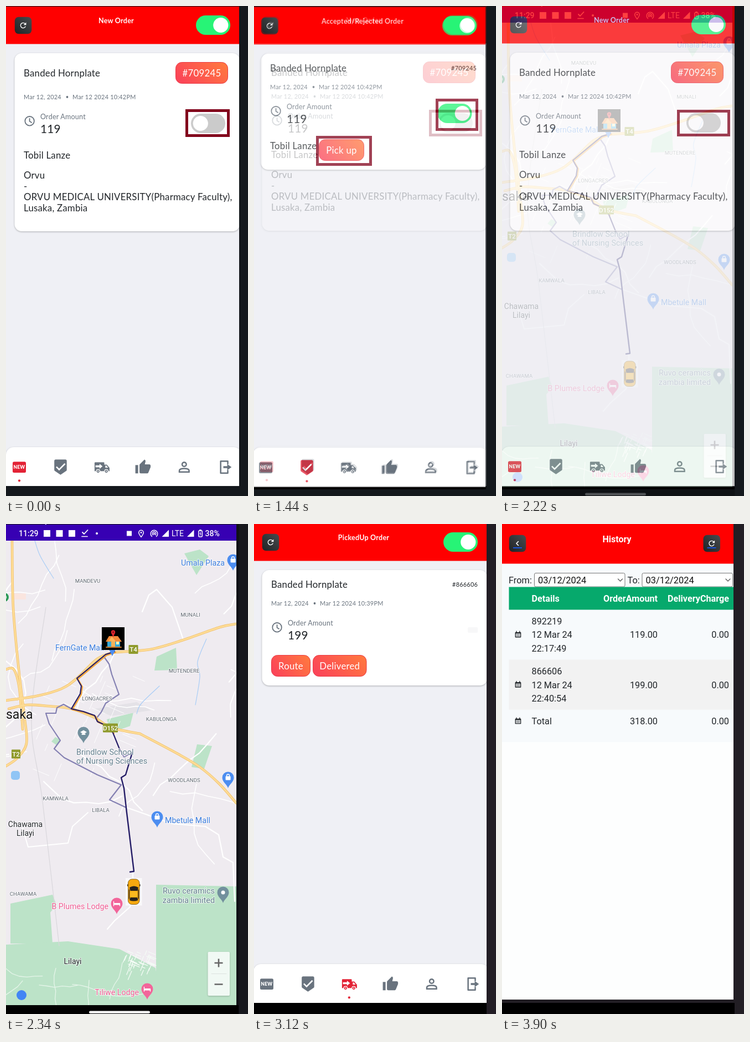
These frames come from a looping animation (437x883 px, 4.56 s). An HTML page:

```html
<!DOCTYPE html>
<html lang="en">
<head>
<meta charset="utf-8">
<title>Delivery app tour</title>
<style>
html, body { margin: 0; width: 100%; height: 100%; overflow: hidden; background: #14181c; }
svg { display: block; width: 100%; height: 100%; }
.app { font-family: Lato, "Open Sans", sans-serif; letter-spacing: .015em; }
.rob { font-family: Roboto, "Liberation Sans", sans-serif; }
.card { filter: drop-shadow(0 1px 1.5px rgba(0,0,0,.28)); }
.halo text { paint-order: stroke; stroke: #fff; stroke-width: 2px; stroke-linejoin: round; stroke-opacity: .75; }
</style>
</head>
<body>
<svg id="stage" viewBox="0 0 437 883" preserveAspectRatio="none"></svg>
<script>
const W = 437, H = 883;
const INK = '#212529', GREY = '#69737e', RED = '#e32235', MARK = '#82021c';

// ---- drawing helpers ----
const rect = (x, y, w, h, fill, r = 0, more = '') =>
  `<rect x="${x}" y="${y}" width="${w}" height="${h}" rx="${r}" fill="${fill}" ${more}/>`;
const dot = (x, y, r, fill) => `<circle cx="${x}" cy="${y}" r="${r}" fill="${fill}"/>`;
const text = (x, y, str, size, fill = INK, anchor = 'start', weight = 400) =>
  `<text x="${x}" y="${y}" font-size="${size}" fill="${fill}" text-anchor="${anchor}" font-weight="${weight}">${str}</text>`;
const path = (d, more = '') => `<path d="${d}" ${more}/>`;
const outline = (color, w) => `fill="none" stroke="${color}" stroke-width="${w}" stroke-linejoin="round" stroke-linecap="round"`;
const line = (pts, color, w, more = '') => `<polyline points="${pts}" ${outline(color, w)} ${more}/>`;
const area = (pts, fill) => `<polygon points="${pts}" fill="${fill}"/>`;
const icon = (x, y, scale, body, fill) =>
  `<g transform="translate(${x} ${y}) scale(${scale}) translate(-12 -12)" fill="${fill}">${body}</g>`;
const frame = (x1, y1, x2, y2) =>
  rect(x1 + 2.5, y1 + 2.5, x2 - x1 - 5, y2 - y1 - 5, 'none', 0, `stroke="${MARK}" stroke-width="5"`);

// Path data of a smooth curve through a few points.
function curve(str) {
  const p = str.split(' ').map(s => s.split(',').map(Number));
  let d = 'M' + p[0];
  for (let i = 0; i < p.length - 1; i++) {
    const a = p[Math.max(i - 1, 0)], b = p[i], c = p[i + 1], e = p[Math.min(i + 2, p.length - 1)];
    const near = b.map((v, k) => v + (c[k] - a[k]) / 6), far = c.map((v, k) => v - (e[k] - b[k]) / 6);
    d += `C${near} ${far} ${c}`;
  }
  return d;
}

// ---- icons on a 24 unit grid ----
const REFRESH = path('M18 15a6.800 6.800 0 1 1-1.200-7.800'.replace(/00/g, ''), outline('#fff', 2)) + path('M20 4v7h-7z');
const CLOCK = path('M2.800 12a9.200 9.200 0 1 0 18.400 0a9.200 9.200 0 1 0-18.400 0M12 7v5.400l4 2.500'.replace(/00/g, ''), outline(GREY, 2));
const BADGE = path('M5 1h14q2 0 2 2v13q0 1-1 1.600L12 23l-8-5.400q-1-.6-1-1.600V3q0-2 2-2z'.replace(/00/g, '')) +
  path('M6 11.500l4 4 8.500-8.500'.replace(/00/g, ''), 'fill="none" stroke="#fff" stroke-width="2"');
const THUMB = path('M1 9h4v12H1zM7 9q0-.8.6-1.400L14.200 1l1 1q.6.6.5 1.400L14.700 8H21q2 0 2 2v2l-3.200 7.800Q19.300 21 18 21H9q-2 0-2-2z'.replace(/00/g, ''));
const PERSON = path('M9 8a3 3 0 1 0 6 0a3 3 0 1 0-6 0M5 19v-2c0-4 14-4 14 0v2z', 'fill="none" stroke="#69737e" stroke-width="2"');
const EXIT = path('M15.4 7V3.4H5.1v17.2h10.3V17', outline(GREY, 2)) + path('M9 10.6h5.6v-3L20.8 12l-6.2 4.4v-3H9z');
const TRUCK = path('M2.6 5h12.2q.9 0 .9.9v2.4h3.7l3.8 4.6v4.8H1.6V6q0-1 1-1z') +
  path('M3 9.3h5.8V7.1l4.4 3.6-4.4 3.6v-2.2H3zM17.2 9.8h1.7l2.2 2.9h-3.9z', 'fill="#fff"') +
  [6.7, 18.6].map(x => `<circle cx="${x}" cy="17.8" r="2.6" stroke="#fff"/>` + dot(x, 17.8, .9, '#fff')).join('');
const NEW = path('M4.4 4.2h15.2q2 0 2 2V18q0 2-2 2H4.4q-2 0-2-2V6.2q0-2 2-2z') + text(12, 14.6, 'NEW', 6.7, '#fff', 'middle', 900);
const CALENDAR = path('M4 6h16v14H4zM7 2v4M17 2v4', outline(INK, 2.4)) + path('M4 6h16v3H4z') +
  [7, 10.7, 14.4].map(x => rect(x, 11, 2.4, 2.2, INK) + rect(x, 15, 2.4, 2.2, INK)).join('');

// ---- shared widgets ----
const toggle = (x, y, on) => rect(x, y, 62, 35, on ? '#27f476' : '#cbcbcb', 17.5) +
  dot(x + (on ? 44.8 : 17.3), y + 17.5, 13.6, '#fff');
const darkKey = (x, y, body) => rect(x, y, 30.5, 30.5, 'url(#key)', 7) + body;
const pill = (x, y, w, label) =>
  rect(x + .5, y + .5, w - 1, 38, 'url(#hot)', 11, 'stroke="#ea3a45"') +
  text(x + w / 2, y + 26, label, 16.8, '#fff', 'middle');

function navBar(active) {
  const items = [NEW, BADGE, TRUCK, THUMB, PERSON, EXIT];
  return rect(0, 795, 425, 100, '#fff', 14, 'class="card"') + items.map((item, i) => {
    const on = i === active, x = 24 + i * 74.45;
    return icon(x, 831, 1.25, item, on ? RED : GREY) + (on ? dot(x, 855.3, 2.1, RED) : '');
  }).join('');
}

// Order list screen; dx, dy place the whole screen on the stage.
function orderScreen(o) {
  const up = o.plain ? 19 : 0;
  const body = rect(-5, 1, 440, 890, '#eff0f5') + rect(-5, 1, 440, 67.5, '#f00') +
    darkKey(15.8, 19.8, icon(31, 35, .68, REFRESH, '#fff')) +
    text(199, 31, o.title, 12.5, '#fff', 'middle', 700) + toggle(343, 17, true) +
    rect(15.5, 85, 406.5, o.cardH, '#fff', 13, 'class="card"') +
    text(32, o.plain ? 117 : 127, 'Banded Hornplate', 16.8) +
    (o.plain ? text(405, 115, o.id, 10.9, INK, 'end') : pill(306, 101, 95, o.id)) +
    text(32, 168 - up, 'Mar 12, 2024', 10.9, GREY) + dot(110.5, 164 - up, 1.9, GREY) +
    text(120, 168 - up, 'Mar 12 2024 ' + o.time, 10.9, GREY) +
    icon(42.6, 207.3 - up, .9, CLOCK, 'none') +
    text(62, 204 - up, 'Order Amount', 12.5, GREY) + text(62, 228.5 - up, o.amount, 20.8) +
    o.extra + navBar(o.active);
  return rect(0, 0, W, H, o.side) + `<g class="app" transform="translate(${o.dx} ${o.dy})">${body}</g>` +
    rect(o.right, 0, W - o.right, H, o.side) + rect(0, o.bottom, W, H - o.bottom, o.side) +
    rect(0, o.bottom, o.right, o.black - o.bottom, '#000') +
    rect(0, 0, W, Math.max(0, 1 + o.dy), o.side) + (o.marks || '');
}

const address = toggle(334, 194, false) + text(32, 275, 'Tobil Lanze', 16.8) +
  ['Orvu', '-', 'ORVU MEDICAL UNIVERSITY(Pharmacy Faculty),', 'Lusaka, Zambia']
    .map((s, i) => text(32, 311 + i * 19.6, s, 16.8)).join('');
const newOrder = o => orderScreen({ title: 'New Order', cardH: 321, id: '#709245', time: '10:42PM',
  amount: 119, active: 0, extra: address, side: '#14181c', ...o });

const accepted = () => orderScreen({ dx: -3, dy: 1, title: 'Accepted/Rejected Order', plain: true, cardH: 209,
  id: '#709245', time: '10:42PM', amount: 119, active: 1, side: '#14181c', right: 418, bottom: 867, black: 871,
  extra: toggle(334.5, 175, true) + text(32, 257, 'Tobil Lanze', 16.8) + pill(120, 239, 82, 'Pick up'),
  marks: frame(328, 167, 405, 225) + frame(112, 234, 213, 288) });

const pickedUp = () => orderScreen({ dx: -1, dy: -2, title: 'PickedUp Order', plain: true, cardH: 208,
  id: '#866606', time: '10:39PM', amount: 199, active: 2, side: '#221d24', right: 420, bottom: 863, black: 883,
  extra: rect(387, 188, 18, 10, '#f7f7f8', 2) + pill(32, 238, 71, 'Route') + pill(107, 238, 97.5, 'Delivered') });

// ---- map screen ----
function rng(seed) {
  return () => (seed = (seed * 16807) % 2147483647) / 2147483647;
}

const GLYPHS = {
  bag: rect(-4.5, -2.5, 9, 7, '#fff', 1) + path('M-2.5-2v-1.5a2.5 2.5 0 0 1 5 0V-2', outline('#fff', 1.3)),
  cap: area('-6,-1 0,-4.5 6,-1 0,2.5', '#fff') + rect(-3.5, 1.5, 7, 2.6, '#fff', 1),
  bed: path('M-5.5-3.5V4M5.5 0v4', outline('#fff', 1.4)) + rect(-5, -1, 11, 3.4, '#fff', 1),
  spot: dot(0, 0, 3.5, '#fff')
};
const pin = (x, y, color, glyph) => `<g transform="translate(${x} ${y})">` +
  path('M0 19C-2 12-10.5 8-10.5 0a10.5 10.5 0 0 1 21 0C10.5 8 2 12 0 19z', `fill="${color}"`) + GLYPHS[glyph] + '</g>';

function statusBar() {
  const w = '#fff', signal = x => area(`${x},23 ${x + 12.5},23 ${x + 12.5},10.5`, w);
  return rect(0, 1, 416, 29, '#3700b3') + text(23, 22, '11:29', 14, w, 'start', 500) +
    [0, 1, 2].map(i => rect(68 + i * 22.5, 11, 12, 12, w)).join('') +
    line('138,15 141,18 147.5,11', w, 1.8) + line('137,22.5 147,22.5', w, 1.7) + dot(164, 17, 2, w) +
    rect(218, 12.5, 9, 9, w) +
    path('M244 23.5c-2-3-4.3-5-4.3-8a4.3 4.3 0 0 1 8.6 0c0 3-2.3 5-4.3 8z', outline(w, 1.5)) + dot(244, 15.5, 1.4, w) +
    path('M263.5 22.5a6.3 6.3 0 1 1 8 0M265.4 19.7a3.2 3.2 0 1 1 4.2 0', outline(w, 1.5)) + dot(267.5, 17.6, 1.6, w) +
    signal(281.5) + text(299, 22, 'LTE', 14, w) + signal(327) +
    rect(347.8, 12, 6.5, 11, 'none', 1.5, 'stroke="#fff" stroke-width="1.5"') + rect(349.3, 10, 3.5, 2, w) +
    line('351.5,14.5 350,17.5 352,17.5 350.7,20.5', w, 1) + text(359.5, 22, '38%', 14, w, 'start', 500);
}

function land() {
  const parks = ['271,650 416,653 416,868 271,868', '8,684 84,668 91,686 80,700 84,756 8,756',
    '0,758 112,752 205,766 270,800 280,868 0,868', '272,239 307,223 309,263 268,264', '322,53 350,46 366,58 344,92',
    '182,352 230,340 224,364 190,376', '345,397 372,400 358,441 335,438', '89,384 99,389 92,399 82,392'];
  return parks.map(p => area(p, '#bce3c8')).join('') + rect(10, 125, 26, 11, '#fae5df') +
    area('160,333 236,321 262,336 190,346', '#e4e2e7') + rect(9, 445, 16, 16, '#90c5f5', 5);
}

// Seeded wandering streets, short town blocks and lanes in the southern green.
function streets() {
  const rand = rng(41), axes = [.4, 1.97, 2.7, 5.1];
  const walk = (x, y, dir, steps, len, bend) => {
    const pts = [];
    for (let i = 0; i <= steps; i++) {
      pts.push(`${x.toFixed(1)},${y.toFixed(1)}`);
      dir += (rand() - .5) * bend;
      x += Math.cos(dir) * len;
      y += Math.sin(dir) * len;
    }
    return pts.join(' ');
  };
  let out = '';
  for (let i = 0; i < 26; i++)
    out += line(walk(rand() * 416, 90 + rand() * 400, axes[i % 4], 7, 16 + rand() * 8, .9), '#fff', i % 3 ? 1.6 : 2.2);
  for (let i = 0; i < 34; i++)
    out += line(walk(45 + rand() * 185, 270 + rand() * 190, axes[i % 2], 1, 10 + rand() * 24, 0), '#fff', .9);
  for (let i = 0; i < 40; i++)
    out += line(walk(215 + rand() * 48, 768 + rand() * 38, axes[i % 2], 1, 6 + rand() * 12, 0), '#f4fbf6', 1.3);
  for (let i = 0; i < 8; i++)
    out += line(walk(i * 30, 785 + rand() * 60, axes[i % 2], 5, 14, .7), '#e6f5ea', 1.3);
  return out + line('229,627 229,655 224,690 196,715 183,730', '#fff', 2.2) +
    line('246,158 258,128 272,118 300,150 320,208', '#fff', 2.2) +
    line('218,511 300,540 360,545 384,560 392,600 410,610 413,680', '#fff', 2.2) +
    line('30,548 40,582 112,575 120,545 148,520', '#fff', 2);
}

function roads() {
  const main = ['11,30 13,150 23,262 33,345 37,395 20,422 0,436', '0,318 55,310 100,297 128,278 165,243 195,231',
    '195,231 260,226 320,209 386,186 416,180', '5,333 38,326 75,328 118,333 160,349 190,367 242,378',
    '242,378 310,414 350,438 385,468 416,503', '0,262 14,262 24,296 30,370'];
  const rivers = ['52,30 62,58 86,98', '362,207 346,248 350,275 342,326', '277,292 244,324 236,342'];
  return rivers.map(p => path(curve(p), outline('#a9cdf6', 1.2))).join('') +
    path(curve('72,150 46,350 66,500 96,760'), outline('#d9d7dc', 1.2)) +
    [['#f2bf69', 4.6], ['#fddc96', 3]].map(([c, w]) => main.map(p => path(curve(p), outline(c, w))).join('')).join('');
}

function routes() {
  const pale = '#8480b2', navy = '#241c66';
  const trip = '196,230 180,235 128,278 136,292 134,306 118,333 140,338 160,345 165,356 181,363 193,376';
  return line('176,238 186,252 191,271 204,307 180,323 172,339 165,348', pale, 2.2) +
    line('118,333 104,325 92,331 90,341 72,341 78,360 98,390 87,405 105,421 165,452 208,470 187,497 217,511', pale, 2.2) +
    line('206,408 213,420 228,412', pale, 1.6) +
    line(trip, '#f5a93f', 2.6, 'transform="translate(1.8 1.4)"') + line(trip + ' 206,408', navy, 2.1) +
    line('228,412 216,452 208,457 213,476 218,520 231,626 224,627', navy, 2.4);
}

const shield = (x, y, w, label) =>
  rect(x - w / 2, y - 8, w, 16, '#8f9a2c', 1) + text(x, y + 4.3, label, 11.5, '#fff', 'middle', 500);

function labels() {
  const blue = '#3c7ddd', slate = '#65808f', pink = '#ee5c93', dark = '#25282c';
  const areas = [['MANDEVU', 147.5, 106], ['MUNALI', 333, 167], ['MUTENDERE', 321.5, 267.5], ['LONGACRES', 164.5, 317.5],
    ['KABULONGA', 280.5, 355], ['WOODLANDS', 321.5, 464.5], ['KAMWALA', 89.5, 497.5], ['LIBALA', 171, 518.5], ['CHAWAMA', 31, 669.5]];
  return '<g class="halo">' + areas.map(([s, x, y]) => text(x, y, s, 9.6, '#5f6670', 'middle')).join('') +
    text(0, 351, 'saka', 23, '#151515') +
    text(35, 545.5, 'Chawama', 14, dark, 'middle') + text(35, 562, 'Lilayi', 14, dark, 'middle') +
    text(120.5, 793, 'Lilayi', 14, dark, 'middle') +
    text(395, 75, 'Umala Plaza', 14.2, blue, 'end') + text(89, 228, 'FernGate Mall', 14.2, blue) +
    text(287, 539, 'Mbetule Mall', 14.2, blue) +
    text(127, 416, 'Brindlow School', 14.4, slate) + text(127, 432, 'of Nursing Sciences', 14.4, slate) +
    text(377, 666, 'Ruvo ceramics', 14.4, slate, 'end') + text(377, 682.5, 'zambia limited', 14.4, slate, 'end') +
    text(185, 694, 'B Plumes Lodge', 14.2, pink, 'end') + text(240, 849, 'Tiliwe Lodge', 14.2, pink, 'end') + '</g>' +
    pin(410, 65, '#4c8df0', 'bag') + pin(401, 457, '#4c8df0', 'bag') + pin(273, 528, '#4c8df0', 'bag') +
    pin(140, 376, '#72909d', 'cap') + pin(392, 664, '#72909d', 'spot') +
    pin(200, 684, '#f2659a', 'bed') + pin(255, 838, '#f2659a', 'bed') + dot(-3, 132, 8, '#2b9a56') + dot(-3, 132, 4, '#fff') +
    shield(230, 226, 17, 'T4') + shield(188.5, 367.5, 27, 'D152') + shield(18, 414.5, 16, 'T2');
}

function markers() {
  const house = area('184,222 200,222 192,238', '#4c8df0') + rect(173, 186, 41, 41, '#000') +
    rect(183, 208, 23, 14, '#35a9dc') + area('180,212 186,202 202,202 209,212', '#f58b3c') +
    area('185,211 191,203 198,211', '#ffb65c') + rect(190, 211, 7, 11, '#f3b15a') + rect(199, 212, 5, 5, '#fff1b0') +
    line('181,222 208,222', '#c9792f', 2) + dot(193.5, 195, 3.7, '#e0262e') + area('190.5,197 196.5,197 193.5,204', '#e0262e') +
    dot(193.5, 195, 1.4, '#7c1015');
  const glass = '#25211d';
  const car = rect(216, 638, 29.5, 49.5, '#faf9fb') + rect(219, 649, 23.5, 4, '#3a3222', 1) +
    rect(220.5, 640, 20.5, 45.5, '#f6a80f', 7, 'stroke="#6a4b0d" stroke-width=".8"') +
    path('M223 655q8-5 16 0l-1.5 6h-13zM224.5 673H237l1.5 5q-8 3-15.5 0z', `fill="${glass}"`) +
    rect(224.5, 662, 12.5, 10, '#fbb81f', 2) + path('M222.5 659v16M239 659v16', outline(glass, 1.4));
  return house + car;
}

function mapScreen() {
  return rect(0, 0, W, H, '#17181d') + '<g class="rob" clip-path="url(#mapClip)">' + rect(0, 30, 416, 838, '#efebf0') +
    land() + streets() + roads() + routes() + labels() + markers() +
    rect(364.5, 771, 39.5, 79, '#fff', 2, 'opacity=".8" class="card"') + line('371,810.5 398,810.5', '#dde3df', 1) +
    path('M376.5 791h15M384 783.5v15M376.5 829.5h15', 'stroke="#666" stroke-width="2.6"') +
    dot(28, 849, 9, '#4285f4') + statusBar() + '</g>' +
    rect(416, 0, 5, H, '#101116') + rect(0, 867, 420, 16, '#000') + rect(150, 877.5, 110, 4.5, '#fff', 2.2);
}

// ---- history screen ----
function historyScreen() {
  const picker = (x, w) => rect(x + .5, 88.5, w - 1, 24.5, '#fff', 2.5, 'stroke="#767676"') +
    text(x + 7, 106.5, '03/12/2024', 16.4, '#111') + path(`M${x + w - 13} 99l4 4 4-4`, outline('#555', 1.2));
  const underline = x => rect(x, 42, 16, 1.8, '#1556f0');
  const cells = (y, size, color, weight, a, b) =>
    text(281, y, a, size, color, 'end', weight) + text(410, y, b, size, color, 'end', weight);
  const row = (y, lines, a, b) => {
    const mid = y + (lines.length - 1) * 12.4;
    return icon(29, mid - 6.2, .58, CALENDAR, INK) + lines.map((s, i) => text(53.5, y + i * 24.8, s, 16.3)).join('') +
      cells(mid, 16.3, INK, 400, a, b);
  };
  return rect(0, 0, W, H, '#221e24') + rect(0, 0, 418, 857, '#fdfefe') + rect(0, 71, 418, 322, '#f7fafc') +
    rect(0, 0, 418, 71.5, '#f00') + '<g class="rob">' +
    darkKey(12.8, 19.8, line('29.5,31.5 26,35 29.5,38.5', '#fff', 1.6) + underline(20)) +
    darkKey(363.5, 19.8, icon(378.7, 35, .68, REFRESH, '#fff') + underline(370.5)) +
    text(207.5, 32.5, 'History', 16, '#fff', 'middle', 700) +
    text(12, 106.5, 'From:', 16.4) + picker(58, 164.5) + text(226.5, 106.5, 'To:', 16.4) + picker(252.5, 164.5) +
    rect(12.5, 113.5, 405.5, 41, '#06a96c') + rect(12.5, 244.5, 405.5, 90, '#f2f2f2') +
    text(53.5, 139.5, 'Details', 16.2, '#fff', 'start', 700) + cells(139.5, 16.2, '#fff', 700, 'OrderAmount', 'DeliveryCharge') +
    row(180.5, ['892219', '12 Mar 24', '22:17:49'], '119.00', '0.00') +
    row(270.7, ['866606', '12 Mar 24', '22:40:54'], '199.00', '0.00') +
    row(361.2, ['Total'], '318.00', '0.00') + '</g>' + rect(0, 863, 420, 20, '#000');
}

// ---- assembly ----
const screens = [
  newOrder({ dx: 0, dy: 0, right: 421, bottom: 865, black: 865, marks: frame(324, 186, 404, 236) }),
  accepted(),
  newOrder({ dx: -1, dy: -1, right: 420, bottom: 865.5, black: 871, marks: frame(316, 187, 412, 235) }),
  mapScreen(), pickedUp(), historyScreen()
];
const stage = document.getElementById('stage');
stage.innerHTML = `<defs>
  <linearGradient id="hot" x1="0" y1=".7" x2="1" y2=".3"><stop offset="0" stop-color="#fb4458"/><stop offset="1" stop-color="#ff7640"/></linearGradient>
  <linearGradient id="key" x1="0" y1="1" x2="1" y2="0"><stop offset="0" stop-color="#1f2325"/><stop offset="1" stop-color="#484c4f"/></linearGradient>
  <clipPath id="mapClip"><rect width="416" height="868"/></clipPath>
</defs>` + screens.map(s => `<g class="screen">${s}</g>`).join('');
const layers = [...stage.querySelectorAll('.screen')];

// Each screen holds, then the next one fades over it in quarter steps.
const HOLD = 660, STEP = 40, SLOT = HOLD + 3 * STEP, LOOP = 4560;
function draw(t) {
  const now = Math.floor(t / SLOT), rest = t - now * SLOT;
  const alpha = rest < HOLD ? 0 : .25 * (1 + Math.floor((rest - HOLD) / STEP));
  layers.forEach((g, i) => {
    const a = i === now ? 1 : i === now + 1 ? alpha : 0;
    g.style.display = a ? '' : 'none';
    g.style.opacity = a;
  });
}
const start = performance.now();
function tick() {
  draw((performance.now() - start) % LOOP);
  requestAnimationFrame(tick);
}
tick();
</script>
</body>
</html>
```
